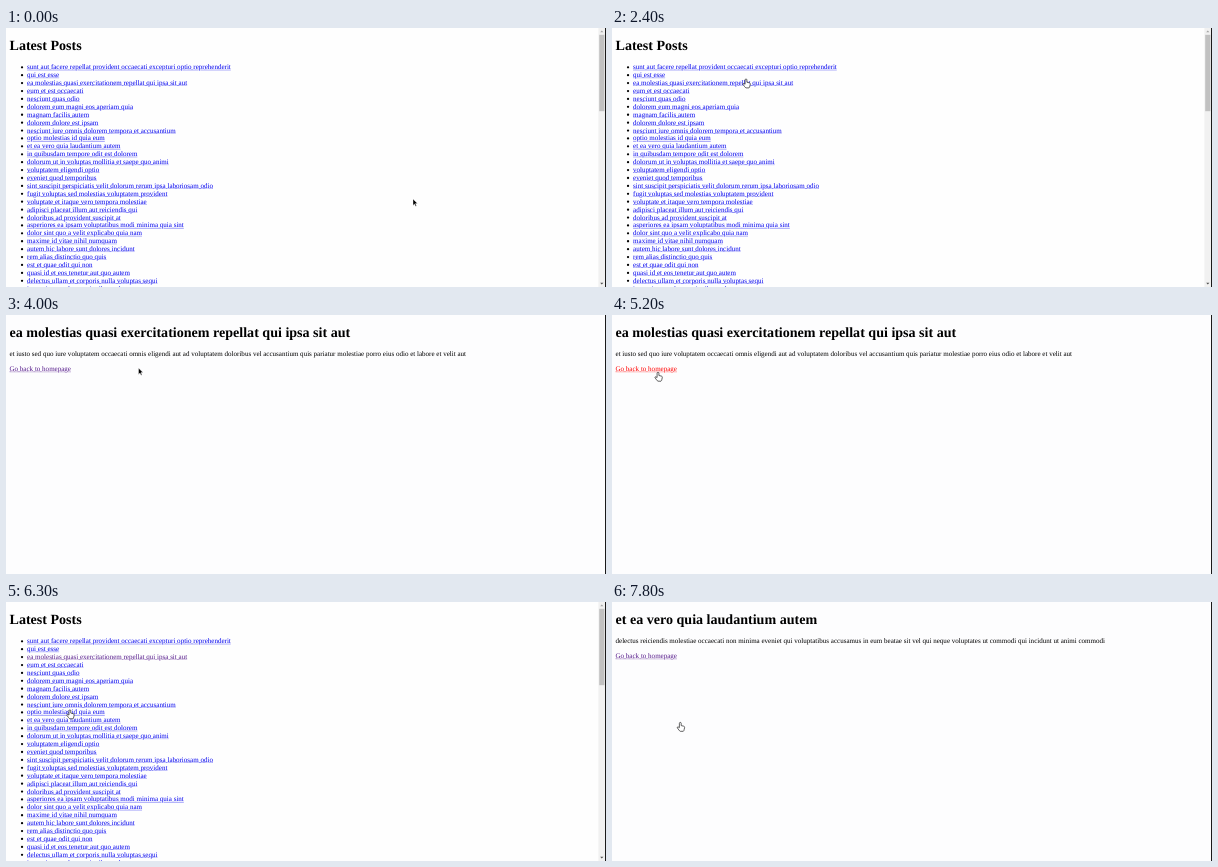
Animation of 600 by 259 pixels, one loop 8000 ms. Source, as an HTML page:

```html
<!DOCTYPE html>
<html lang="en">
<head>
<meta charset="utf-8">
<title>Latest Posts</title>
<style>
  html, body { margin: 0; width: 100%; height: 100%; overflow: hidden; background: #fefefe; }
  svg { display: block; width: 100vw; height: 100vh; }
  text { font: 16px "Liberation Serif", "Times New Roman", serif; text-rendering: geometricPrecision; }
  .title { font-size: 32px; font-weight: bold; }
  .link { fill: #0000ee; }
  /* the halo breaks the underline around descenders */
  .link text { stroke: #fefefe; stroke-width: 2px; paint-order: stroke; }
  .visited { fill: #551a8b; }
  .active { fill: #ff0000; }
</style>
</head>
<body>
<svg id="stage" viewBox="0 0 600 259">
  <rect id="paper" width="600" height="259"/>
  <g id="list">
    <g class="page"></g>
    <rect x="592.4" width="6.8" height="259" fill="#f1f1f1"/>
    <rect x="593.2" y="6.8" width="5.2" height="76.4" fill="#c1c1c1"/>
    <path d="M594.2 4.2l1.6-1.8 1.6 1.8z" fill="#a3a3a3"/>
    <path d="M594.2 254.8l1.6 1.8 1.6-1.8z" fill="#505050"/>
  </g>
  <g id="detail"><g class="page"></g></g>
  <rect x="599.1" width="0.9" height="259" fill="#000"/>
  <g id="pointer">
    <path id="arrow" fill="#000" stroke="#fff" stroke-width=".4"
      d="M0 0V6.4L1.5 5 2.5 7.3 3.5 6.9 2.5 4.6H4.5z"/>
    <path id="hand" fill="#fff" stroke="#222" stroke-width=".7" stroke-linejoin="round"
      d="M-.9 5.2V.9a.9.9 0 0 1 1.8 0V3.2l2.5.6q1 .3 .9 1.3L3.9 7q-.3 1.6-.9 1.9H0q-.8-.4-1.4-1.3L-3 5.4q-.2-1 .8-.9z"/>
  </g>
</svg>
<script>
const SCALE = 600 / 1366, LOOP = 8000, TICK = 100;
const LEFT = 8, INDENT = 48, TITLE_Y = 50, BODY_Y = 94, ROW = 18;

const posts = `sunt aut facere repellat provident occaecati excepturi optio reprehenderit
qui est esse
ea molestias quasi exercitationem repellat qui ipsa sit aut
eum et est occaecati
nesciunt quas odio
dolorem eum magni eos aperiam quia
magnam facilis autem
dolorem dolore est ipsam
nesciunt iure omnis dolorem tempora et accusantium
optio molestias id quia eum
et ea vero quia laudantium autem
in quibusdam tempore odit est dolorem
dolorum ut in voluptas mollitia et saepe quo animi
voluptatem eligendi optio
eveniet quod temporibus
sint suscipit perspiciatis velit dolorum rerum ipsa laboriosam odio
fugit voluptas sed molestias voluptatem provident
voluptate et itaque vero tempora molestiae
adipisci placeat illum aut reiciendis qui
doloribus ad provident suscipit at
asperiores ea ipsam voluptatibus modi minima quia sint
dolor sint quo a velit explicabo quia nam
maxime id vitae nihil numquam
autem hic labore sunt dolores incidunt
rem alias distinctio quo quis
est et quae odit qui non
quasi id et eos tenetur aut quo autem
delectus ullam et corporis nulla voluptas sequi
iusto eius quod necessitatibus culpa ea`.split("\n");

const bodies = {
  2: "et iusto sed quo iure voluptatem occaecati omnis eligendi aut ad voluptatem doloribus vel accusantium quis pariatur molestiae porro eius odio et labore et velit aut",
  10: "delectus reiciendis molestiae occaecati non minima eveniet qui voluptatibus accusamus in eum beatae sit vel qui neque voluptates ut commodi qui incidunt ut animi commodi"
};

const byId = id => document.getElementById(id);

function add(parent, tag, attrs, text = "") {
  const node = document.createElementNS("http://www.w3.org/2000/svg", tag);
  for (const key in attrs) node.setAttribute(key, attrs[key]);
  node.textContent = text;
  return parent.appendChild(node);
}

function addLink(parent, x, y, label) {
  const link = add(parent, "g", { class: "link" });
  const line = add(link, "rect", { x, y: y + 1, height: 1 });
  const text = add(link, "text", { x, y }, label);
  line.setAttribute("width", text.getComputedTextLength());
  return link;
}

const [listPage, detailPage] = document.querySelectorAll(".page");
for (const page of [listPage, detailPage]) page.setAttribute("transform", `scale(${SCALE})`);

add(listPage, "text", { x: LEFT, y: TITLE_Y, class: "title" }, "Latest Posts");
const links = posts.map((post, i) => {
  const y = BODY_Y + i * ROW;
  add(listPage, "circle", { cx: 36.5, cy: y - 4.5, r: 2.6 });
  return addLink(listPage, INDENT, y, post);
});

const title = add(detailPage, "text", { x: LEFT, y: TITLE_Y, class: "title" });
const body = add(detailPage, "text", { x: LEFT, y: BODY_Y });
const back = addLink(detailPage, LEFT, BODY_Y + 34, "Go back to homepage");

// Pointer moves: start and end time, start and end position
const moves = [
  { from: 200, to: 1000, a: [407, 171], b: [134, 51] },
  { from: 4000, to: 4600, a: [132.5, 53], b: [46, 57.3] },
  { from: 5800, to: 6500, a: [46, 57.3], b: [68.3, 120.4] }
];

const within = (t, start, end) => t >= start && t < end;
const ease = p => p * p * (3 - 2 * p);

function pointerAt(t) {
  const move = moves.filter(m => t >= m.from).pop() || moves[0];
  const p = ease(Math.min(1, Math.max(0, (t - move.from) / (move.to - move.from))));
  return move.a.map((v, i) => v + (move.b[i] - v) * p);
}

const linkClass = (visited, active) =>
  "link" + (visited ? " visited" : "") + (active ? " active" : "");

function show(id, on) {
  byId(id).setAttribute("visibility", on ? "visible" : "hidden");
}

function draw(time) {
  const t = Math.floor((time % LOOP) / TICK) * TICK;
  const onDetail = within(t, 2700, 5500) || t >= 7800;
  const post = t < 5500 ? 2 : 10;

  show("list", !onDetail);
  show("detail", onDetail);
  byId("paper").setAttribute("fill", onDetail ? "#fdfdfe" : "#fefefe");
  title.textContent = posts[post];
  body.textContent = bodies[post];

  links[2].setAttribute("class", linkClass(t >= 5500, within(t, 2100, 2200)));
  links[10].setAttribute("class", linkClass(false, within(t, 7000, 7100)));
  back.setAttribute("class", linkClass(true, within(t, 5200, 5300)));

  const overLink = within(t, 1000, 4000) || t >= 5000;
  show("hand", overLink);
  show("arrow", !overLink);
  byId("pointer").setAttribute("transform", `translate(${pointerAt(t)})`);
}

function loop() {
  draw(performance.now());
  requestAnimationFrame(loop);
}
loop();
</script>
</body>
</html>
```
